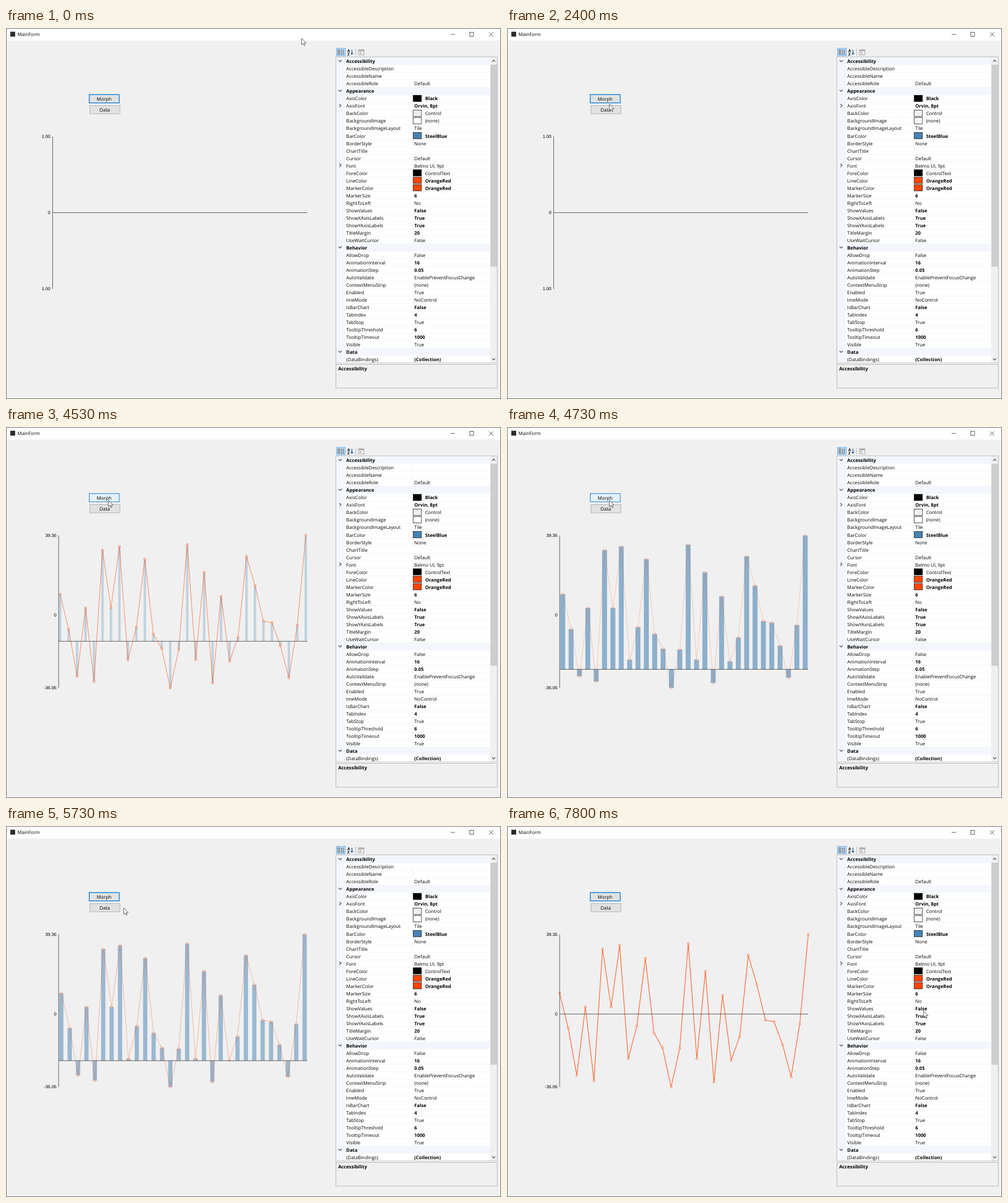
Recreate the animation shown at these times as an HTML page with a canvas. Size 865x648 px, loop 8000 ms.

```html
<!DOCTYPE html>
<html lang="en">
<head>
<meta charset="utf-8">
<title>MainForm</title>
<style>
  html, body { margin: 0; width: 100%; height: 100%; overflow: hidden; background: #f0f0f0; }
  canvas { display: block; }
</style>
</head>
<body>
<canvas id="stage" width="865" height="648"></canvas>
<script>
const ctx = document.getElementById('stage').getContext('2d');
ctx.textRendering = 'geometricPrecision';
const LOOP = 8000, TICK = 1000 / 15;
const UI = '8.2px "Open Sans", sans-serif';
const AXIS = '7.8px "Liberation Sans", sans-serif';

// '#' category, '+' expandable, '*' bold value
const rows = `#Accessibility
AccessibleDescription|
AccessibleName|
AccessibleRole|Default
#Appearance
AxisColor|*Black
+AxisFont|*Orvin, 8pt
BackColor|Control
BackgroundImage|(none)
BackgroundImageLayout|Tile
BarColor|*SteelBlue
BorderStyle|None
ChartTitle|
Cursor|Default
+Font|Belmo UI, 9pt
ForeColor|ControlText
LineColor|*OrangeRed
MarkerColor|*OrangeRed
MarkerSize|*6
RightToLeft|No
ShowValues|*False
ShowXAxisLabels|*True
ShowYAxisLabels|*True
TitleMargin|*20
UseWaitCursor|False
#Behavior
AllowDrop|False
AnimationInterval|*16
AnimationStep|*0.05
AutoValidate|EnablePreventFocusChange
ContextMenuStrip|(none)
Enabled|True
ImeMode|NoControl
IsBarChart|*False
TabIndex|*4
TabStop|True
TooltipThreshold|*6
TooltipTimeout|*1000
Visible|True
#Data
(DataBindings)|*(Collection)`.split('\n');
const swatches = {
  AxisColor: 'black', BackColor: '#f0f0f0', BackgroundImage: 'white', BarColor: 'steelblue',
  ForeColor: 'black', LineColor: 'orangered', MarkerColor: 'orangered'
};

const samples = [10.3, -7, -30.3, 3.5, -32.9, 32.1, 3.5, 33.9, -22.1, -6, 27.6, -9.4, -16.7, -36.06, -17.1,
  34.8, -22.1, 21.1, -33.6, 9.2, -22.9, -11.1, 29, 14.5, -3, -3.8, -15.2, -31, -5, 39.36];

// Pointer moves: start, end, target x, target y
const home = [516.5, 18];
const moves = [
  [1067, 1730, 225, 168], [1730, 2200, 179, 133],
  [2400, 2600, 179, 137], [3000, 3130, 179, 126],
  [3400, 3600, 179, 133], [3900, 4060, 179, 128],
  [5667, 6060, 531, 326], [6200, 6400, 653, 374],
  [6530, 6730, 685, 491], [6867, 7800, 728, 323]
];

const HOLD = 130;
const clicks = [{ label: 'Data', at: 2733 }, { label: 'Morph', at: 4266 }, { label: 'Morph', at: 5466 }];
const buttons = [{ label: 'Morph', x: 145.5, y: 116.3 }, { label: 'Data', x: 146.7, y: 135.4 }];
const looks = {
  normal: { face: '#e1e1e1', border: '#adadad', width: 0.9 },
  focus: { face: '#e1e1e1', border: '#0078d7', width: 1.3 },
  hover: { face: '#e5f1fb', border: '#0078d7', width: 0.9 },
  press: { face: '#cce4f7', border: '#005499', width: 0.9 }
};

const clamp = v => Math.max(0, Math.min(1, v));
const mix = (a, b, k) => a + (b - a) * k;
const smooth = k => k * k * (3 - 2 * k);

function fill(x, y, w, h, color) {
  ctx.fillStyle = color;
  ctx.fillRect(x, y, w, h);
}
function box(x, y, w, h, color, width = 1) {
  ctx.strokeStyle = color;
  ctx.lineWidth = width;
  ctx.strokeRect(x, y, w, h);
}
function line(pts, color, width = 1) {
  ctx.strokeStyle = color;
  ctx.lineWidth = width;
  ctx.beginPath();
  pts.forEach(([x, y]) => ctx.lineTo(x, y));
  ctx.stroke();
}
function text(str, x, y, { font = UI, bold = false, align = 'left' } = {}) {
  ctx.font = (bold ? 'bold ' : '') + font;
  ctx.fillStyle = '#000';
  ctx.textAlign = align;
  ctx.fillText(str, x, y + 3);
}
// (dx, dy) is the half depth in the pointing direction
function chevron(x, y, dx, dy, color = '#444', width = 1.2) {
  line([[x - dx - 2 * dy, y - dy - 2 * dx], [x + dx, y + dy], [x - dx + 2 * dy, y - dy + 2 * dx]], color, width);
}

function drawWindow() {
  fill(0, 0, 865, 648, '#f0f0f0');
  fill(0, 0, 865, 22, '#fff');
  box(0.5, 0.5, 864, 647, '#6e6e6e');
  fill(7.5, 6.5, 8.5, 8.5, '#2b2b2b');
  text('MainForm', 20, 11.3);
  line([[777, 11.2], [784.5, 11.2]], '#333', 0.8);
  box(810.5, 7.5, 6.5, 7, '#333', 0.8);
  line([[844, 7.5], [851.5, 15]], '#333', 0.8);
  line([[851.5, 7.5], [844, 15]], '#333', 0.8);
}

function drawToolbar() {
  fill(577, 35, 16, 14, '#c5e0f7');
  box(577.5, 35.5, 15.5, 13, '#69b1ec');
  for (const y of [38, 43]) {
    box(580, y, 3, 3, '#555', 0.9);
    for (const x of [585, 588.5]) for (const dy of [0, 2.5]) fill(x, y + dy, 2.5, 1.3, '#666');
  }
  const small = { font: '6.5px "Open Sans", sans-serif', bold: true };
  text('A', 596.5, 38.6, small);
  text('Z', 596.5, 44.6, small);
  line([[604.5, 38], [604.5, 46]], '#1769b5', 1.4);
  chevron(604.5, 44.8, 0, 1, '#1769b5', 1.4);
  line([[611, 36], [611, 49]], '#b5b5b5');
  box(616, 38, 9.5, 9, '#a6a6a6');
  fill(616, 38, 9.5, 2.5, '#a6a6a6');
  fill(618, 42, 3, 3, '#bbb');
}

function drawGrid() {
  const tint = '#f3f6fc';
  fill(576, 50, 283, 535, '#fff');
  fill(577, 51, 15, 534, tint);
  rows.forEach((row, i) => {
    const y = 58 + i * 13.02, bottom = y + 6.5;
    if (row[0] === '#') {
      fill(577, y - 6.5, 269, 13, tint);
      chevron(584, y - 0.5, 0, 1.4);
      text(row.slice(1), 594.6, y, { bold: true });
      return;
    }
    line([[592, bottom], [846, bottom]], tint);
    line([[711, y - 6.5], [711, bottom]], tint);
    if (row[0] === '+') chevron(584, y - 0.5, 1.4, 0);
    const [name, value] = row.replace('+', '').split('|');
    const swatch = swatches[name];
    text(name, 594.6, y + 0.3);
    if (swatch) {
      const top = Math.round(y - 6) + 0.5;
      fill(711.5, top, 14.5, 11, swatch);
      box(711.5, top, 14.5, 11, '#222', 0.8);
    }
    text(value.replace('*', ''), swatch ? 732.4 : 713.6, y + 0.3, { bold: value[0] === '*' });
  });
  fill(846, 51, 12.5, 534, '#f0f0f0');
  fill(846.5, 64, 11.5, 353, '#cdcdcd');
  chevron(852.2, 57.5, 0, -1.3);
  chevron(852.2, 578.5, 0, 1.3);
  box(576.5, 50.5, 282, 534.5, '#b4b4b4', 0.9);
  fill(576, 585.5, 283, 1.5, '#f0f0f0');
  box(576.5, 587.5, 282, 41.5, '#b4b4b4', 0.9);
  text('Accessibility', 580.4, 595.3, { bold: true });
}

function pointerAt(t) {
  return moves.reduce(([px, py], [start, end, x, y]) => {
    const k = smooth(clamp((t - start) / (end - start)));
    return [mix(px, x, k), mix(py, y, k)];
  }, home);
}

function drawButton({ label, x, y }, t, [px, py]) {
  const w = 52.4, h = 14.5;
  const last = clicks.findLast(c => c.at <= t) ?? { label: 'Morph', at: -HOLD };
  const focused = last.label === label;
  const hovered = px > x && px < x + w && py > y && py < y + h;
  const state = focused && t < last.at + HOLD ? 'press' : hovered ? 'hover' : focused ? 'focus' : 'normal';
  const { face, border, width } = looks[state];
  fill(x, y, w, h, face);
  box(x, y, w, h, border, width);
  text(label, x + w / 2 - 0.3, y + 7.5, { align: 'center' });
}

function drawSeries(m, left, width, base, toY) {
  const n = samples.length;
  const xs = samples.map((_, i) => left + width * mix(i / (n - 1), (i + 0.5) / n, m));
  const ys = samples.map(toY);
  const barWidth = width / n * 0.8 * m;
  ctx.globalAlpha = 200 / 255 * m;
  ys.forEach((y, i) => fill(xs[i] - barWidth / 2, y, barWidth, base - y, 'steelblue'));
  ctx.globalAlpha = 0.85 * (1 - m);
  ctx.lineJoin = 'round';
  line(ys.map((y, i) => [xs[i], y]), 'orangered', 1.1);
  ctx.lineJoin = 'miter';
  ctx.globalAlpha = 1 - m ** 3;
  ys.forEach((y, i) => {
    ctx.beginPath();
    ctx.arc(xs[i], y, 1.7, 0, 7);
    ctx.fillStyle = '#f7f3f1';
    ctx.fill();
    ctx.strokeStyle = 'orangered';
    ctx.lineWidth = 0.75;
    ctx.stroke();
  });
  ctx.globalAlpha = 1;
}

function drawChart(t) {
  const [load, toBars, toLine] = clicks.map(c => c.at);
  const ramp = press => clamp((t - press - 80) / 520);
  const loaded = t >= load + HOLD;
  const morph = ramp(toBars) - ramp(toLine);
  const left = loaded ? 92 : 81.5, right = 526.5, top = 189.3, bottom = 455.8;
  const max = loaded ? Math.max(...samples) : 1;
  const min = loaded ? Math.min(...samples) : -1;
  const toY = v => mix(bottom, top, (v - min) / (max - min));
  const base = mix(toY(0), bottom, morph);
  if (loaded) drawSeries(morph, left, right - left, base, toY);
  line([[left, top], [left, bottom]], '#4c4c4c', 0.9);
  line([[left, base], [right, base]], '#4c4c4c', 0.9);
  ctx.save();
  ctx.beginPath();
  ctx.rect(62, 180, 40, 290);
  ctx.clip();
  for (const [v, label] of [[max, max.toFixed(2)], [0, '0'], [min, min.toFixed(2)]]) {
    text(label, left - 3.8, toY(v) - 0.5, { font: AXIS, align: 'right' });
  }
  ctx.restore();
}

function drawPointer([x, y]) {
  ctx.save();
  ctx.translate(x, y);
  ctx.scale(0.7, 0.7);
  ctx.fillStyle = '#fff';
  ctx.strokeStyle = '#333';
  ctx.lineWidth = 1.1;
  const arrow = new Path2D('M0 0V16L3.8 12.6 6.4 18.4 8.8 17.3 6.3 11.7 11.3 11.5Z');
  ctx.fill(arrow);
  ctx.stroke(arrow);
  ctx.restore();
}

function render(now) {
  // The picture advances in fixed ticks
  const t = Math.floor((now % LOOP + 4) / TICK) * TICK;
  const pointer = pointerAt(t);
  drawWindow();
  drawToolbar();
  drawGrid();
  buttons.forEach(button => drawButton(button, t, pointer));
  drawChart(t);
  drawPointer(pointer);
}

let start;
function frame(now) {
  start ??= now;
  render(now - start);
  requestAnimationFrame(frame);
}
requestAnimationFrame(frame);
</script>
</body>
</html>
```
